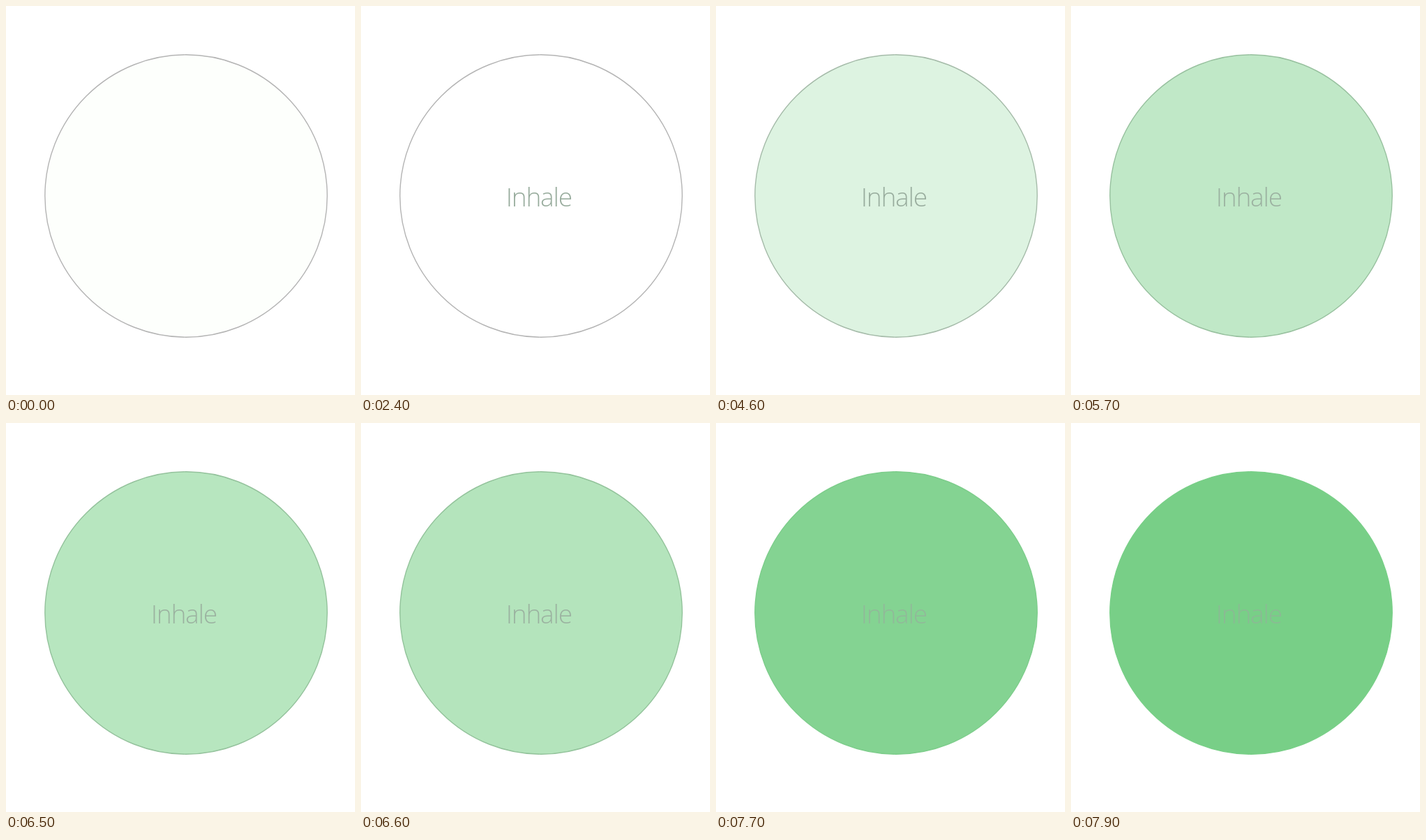
Animation, 500 px wide and 557 px high, one loop 8 s. Source, as an HTML page:

```html
<!DOCTYPE html>
<html lang="en">
<head>
<meta charset="utf-8">
<style>
  html, body { margin: 0; width: 100%; height: 100%; overflow: hidden; background: #fff; }
  svg { display: block; }
  text { font: 300 37px "Open Sans", "Noto Sans", sans-serif; letter-spacing: -1.2px; }
</style>
</head>
<body>
<svg width="500" height="557" viewBox="0 0 500 557">
  <circle id="disc" cx="258" cy="272" r="202.2" stroke-width="1.4"/>
  <text id="word" x="207.7" y="286.5" fill="rgb(152,172,157)">Inhale</text>
</svg>
<script>
const LOOP = 8000, STEP = 100;
const WHITE = [255, 255, 255], TINT = [253, 255, 252];
const GREY = [180, 180, 180], GREEN = [120, 207, 135];

// How far the disc has turned green: [time, share]
const BREATH = [[2900, 0], [4600, .25], [5700, .47], [6500, .53], [7300, .73], [7900, 1]];

const ramp = (t, from, to) => Math.min(1, Math.max(0, (t - from) / (to - from)));
const mix = (a, b, k) => a.map((v, i) => v + (b[i] - v) * k);
const rgb = color => `rgb(${color.map(Math.round)})`;

// Each segment adds its share as time passes through it
function breath(t) {
  return BREATH.slice(1).reduce((sum, [time, share], i) => {
    const [start, base] = BREATH[i];
    return sum + (share - base) * ramp(t, start, time);
  }, 0);
}

const disc = document.getElementById("disc");
const word = document.getElementById("word");

function draw() {
  const t = Math.floor(performance.now() % LOOP / STEP) * STEP;
  const green = breath(t);
  const pale = mix(TINT, WHITE, ramp(t, 1200, 2100));
  disc.setAttribute("fill", rgb(mix(pale, GREEN, green)));
  disc.setAttribute("stroke", rgb(mix(GREY, GREEN, green)));
  word.setAttribute("opacity", ramp(t, 800, 2200) ** 2 * (1 - .4 * green ** 2));
  requestAnimationFrame(draw);
}
draw();
</script>
</body>
</html>
```
